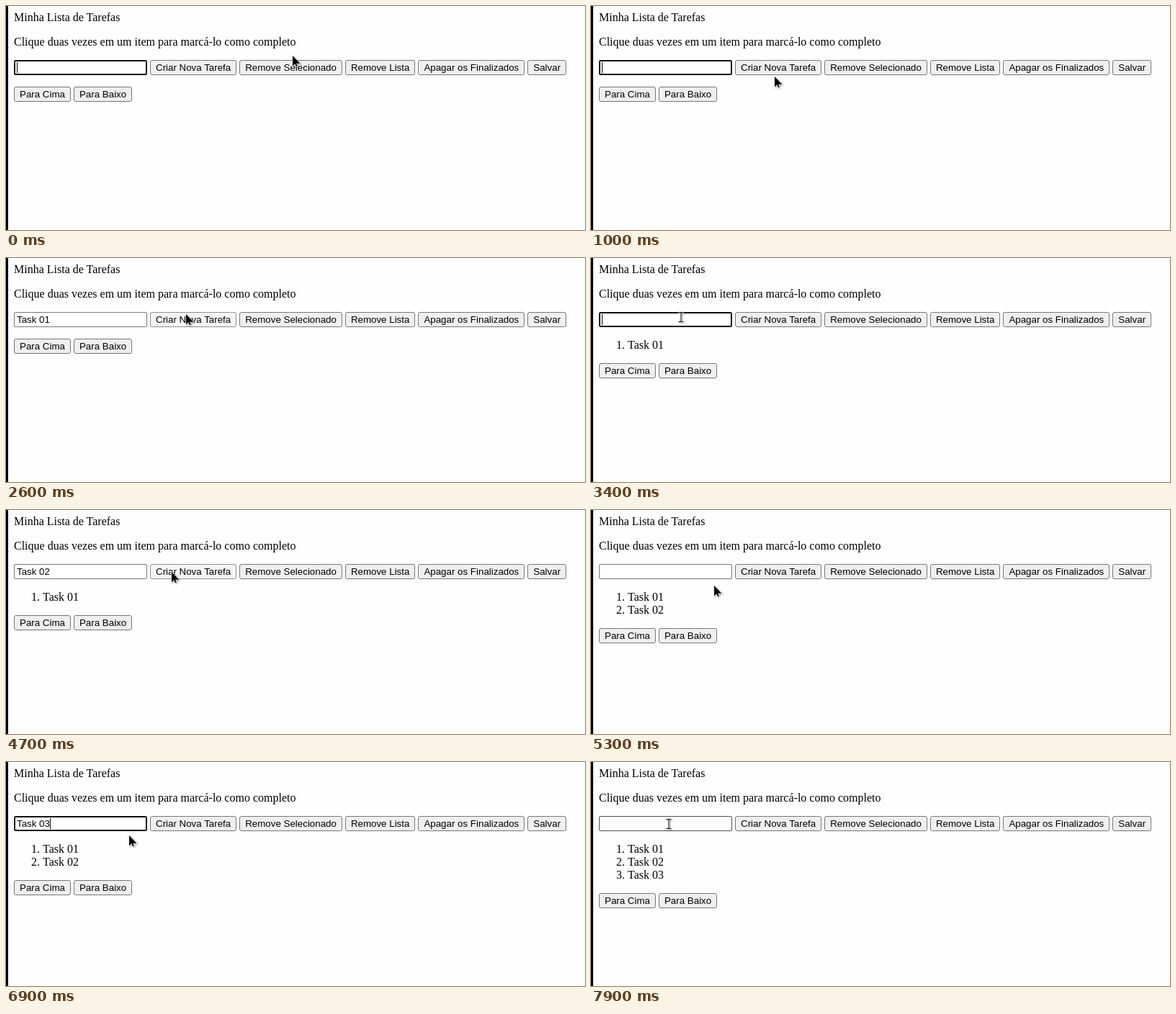
Write an HTML page that moves like this. It is 804 by 311 pixels and loops after 8 s.

```html
<!DOCTYPE html>
<html lang="pt-BR">
<head>
<meta charset="utf-8">
<title>Minha Lista de Tarefas</title>
<style>
html, body { margin: 0; width: 100%; height: 100%; overflow: hidden; background: #fefefe; }
#stage { position: relative; width: 804px; height: 311px; overflow: hidden; background: #fefefe;
  font: 16px/18px "Liberation Serif", "Times New Roman", serif; color: #000; white-space: nowrap; }
#stage > * { position: absolute; left: 11px; margin: 0; }
#stage > .edge { left: 0; top: 0; width: 3px; height: 311px; background: #000; }
.row { display: flex; gap: 4px; font: 13.333px/15px "Liberation Sans", Arial, sans-serif; }
.btn, #field { box-sizing: border-box; height: 21px; border: 1px solid #767676; border-radius: 3px; }
.btn { padding: 2px 7px; background: #efefef; }
.btn.hover { background: #e5e5e5; border-color: #4f4f4f; }
.btn.press { background: #f5f5f5; border-color: #8d8d8d; }
#field { width: 185px; padding: 2px 3px; background: #fff; border-radius: 2px; }
#field.hover { border-color: #4f4f4f; }
#field.focus { border-color: #101010; box-shadow: inset 0 0 0 1px #101010; }
#caret { display: inline-block; width: 1px; height: 15px; margin-left: -.45px; vertical-align: top; background: #000; }
ol { top: 112px; padding: 0 0 0 40px; }
#stage > svg { left: 0; top: 0; overflow: visible; filter: drop-shadow(1px 1px 1px #0006); }
svg path { fill: #000; stroke: #fff; stroke-width: 1.2; paint-order: stroke; }
</style>
</head>
<body>
<div id="stage">
  <div class="edge"></div>
  <p style="top:7px">Minha Lista de Tarefas</p>
  <p style="top:41px">Clique duas vezes em um item para marcá-lo como completo</p>
  <div class="row" style="top:75px">
    <div id="field"><span id="value"></span><span id="caret"></span></div>
    <div class="btn" id="add">Criar Nova Tarefa</div>
    <div class="btn">Remove Selecionado</div>
    <div class="btn">Remove Lista</div>
    <div class="btn">Apagar os Finalizados</div>
    <div class="btn">Salvar</div>
  </div>
  <ol><li>Task 01</li><li>Task 02</li><li>Task 03</li></ol>
  <div class="row" id="order">
    <div class="btn">Para Cima</div>
    <div class="btn">Para Baixo</div>
  </div>
  <svg id="pointer" width="1" height="1">
    <path id="arrow" d="M0 0V14.3L3.2 11.2 5.1 15.2 6.8 14.4 5.1 10.7H10.4Z"/>
    <path id="beam" d="M-3.5-7H-1L0-6.4 1-7H3.5V-6H1.4L.5-5.2V5.2L1.4 6H3.5V7H1L0 6.4-1 7H-3.5V6H-1.4L-.5 5.2V-5.2L-1.4-6H-3.5Z"/>
  </svg>
</div>
<script>
const LOOP = 8000, STEP = 100, BLINK = 500;

// One entry per task; the digit follows at a steady pace, the item appears on release.
const tasks = [
  { focus: 0, type: 1300, press: 2500 },
  { focus: 3400, type: 3800, press: 4700 },
  { focus: 5700, type: 6100, press: 7400 }
].map((task, i) => ({ ...task, digit: 1600 + 2650 * i, release: task.press + 150 }));

// Eased pointer moves; bow bends the path up or down.
const start = { x: 398, y: 69 };
const glides = [
  { from: 0, to: 1000, x: 255, y: 98, bow: 55 },
  { from: 1000, to: 1100, x: 243, y: 95 },
  { from: 1700, to: 2500, x: 250, y: 78, bow: -35 },
  { from: 2700, to: 3200, x: 125, y: 82, bow: 22 },
  { from: 4300, to: 4600, x: 230, y: 86 },
  { from: 4850, to: 5300, x: 171, y: 105 },
  { from: 5300, to: 5500, x: 165, y: 83 },
  { from: 5900, to: 6700, x: 171, y: 102 },
  { from: 6900, to: 7300, x: 215, y: 86 },
  { from: 7600, to: 7900, x: 108, y: 86 }
];

const el = id => document.getElementById(id);
const all = selector => [...document.querySelectorAll(selector)];
const ease = u => u * u * (3 - 2 * u);

function pointerAt(t) {
  let { x, y } = start;
  for (const g of glides) {
    const u = ease(Math.min(1, Math.max(0, (t - g.from) / (g.to - g.from))));
    x += (g.x - x) * u;
    y += (g.y - y) * u + (g.bow || 0) * Math.sin(Math.PI * u);
  }
  return [Math.round(x), Math.round(y)];
}

function draw(now) {
  const t = Math.floor(now % LOOP / STEP) * STEP;
  const [x, y] = pointerAt(t);
  const over = node => {
    const r = node.getBoundingClientRect();
    return x >= r.left && x < r.right && y >= r.top && y < r.bottom;
  };

  const index = tasks.findLastIndex(task => t >= task.focus);
  const { focus, type, digit, press, release } = tasks[index];
  const typing = t < press, done = t >= release;
  const lastEdit = Math.max(...[focus, type, digit].filter(time => time <= t));

  el("value").textContent = done || t < type ? "" : "Task 0" + (t < digit ? "" : index + 1);
  el("caret").style.opacity = typing && (t - lastEdit) % (2 * BLINK) < BLINK ? 1 : 0;
  el("field").className = typing ? "focus" : over(el("field")) ? "hover" : "";

  const count = index + done;
  all("li").forEach((item, i) => item.hidden = i >= count);
  el("order").style.top = 112 + (count && count * 18 + 16) + "px";

  all(".btn").forEach(btn => btn.classList.toggle("hover", over(btn)));
  el("add").classList.toggle("press", !typing && !done);

  const beam = [el("field"), ...all("p")].some(over);
  el("arrow").style.display = beam ? "none" : "";
  el("beam").style.display = beam ? "" : "none";
  el("pointer").style.transform = `translate(${x}px, ${y}px)`;
}

function tick() {
  draw(performance.now());
  requestAnimationFrame(tick);
}
tick();
</script>
</body>
</html>
```
